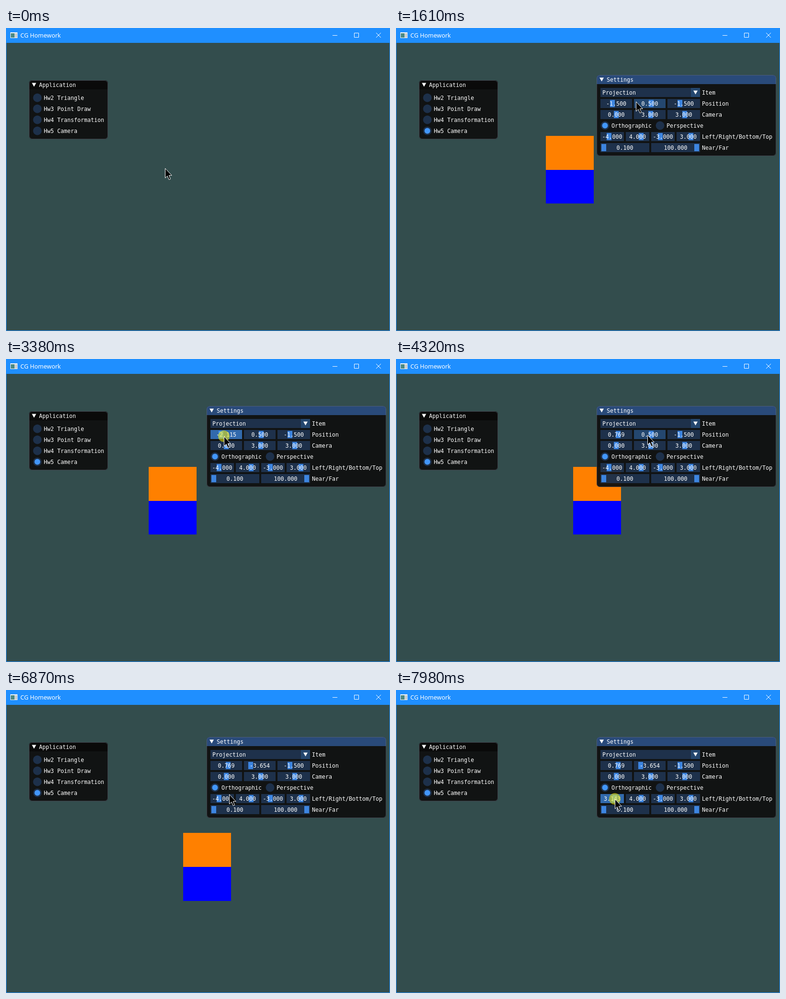
An HTML page that plays this animation: 802 by 632 pixels, repeating every 8000 ms.

```html
<!DOCTYPE html>
<html lang="en">
<head>
<meta charset="utf-8">
<title>CG Homework</title>
<style>
  html, body { margin: 0; width: 100%; height: 100%; overflow: hidden; background: #334d4d; }
  svg { display: block; width: 802px; height: 632px; }
  text { fill: #fff; font: 11.63px "DejaVu Sans Mono", monospace; white-space: pre; }
  .caption { font: 12.5px "Noto Sans", "Open Sans", sans-serif; }
  .mid { text-anchor: middle; }
</style>
</head>
<body>
<svg id="stage" viewBox="0 0 802 632"></svg>
<script>
const LOOP = 8000, STEP = 76.8, START = 55;
const FRAME = 'rgba(41,74,122,.54)', HOVER = 'rgba(66,150,250,.4)', ACTIVE = 'rgba(66,150,250,.67)';
const GRAB = '#3d85e0', GRAB_ACTIVE = '#4296fa', TITLE = '#0a0a0a', TITLE_ACTIVE = '#294a7a';
const ACCENT = '#1f8fff';
const ROW = 23, SIZE = 19, GAP = 4, PAD = 8;

const stage = document.getElementById('stage');

function add(parent, tag, attrs, text) {
  const el = document.createElementNS('http://www.w3.org/2000/svg', tag);
  set(el, attrs);
  if (text !== undefined) el.textContent = text;
  parent.appendChild(el);
  return el;
}
function set(el, attrs) {
  for (const k in attrs) el.setAttribute(k, attrs[k]);
}
const group = () => add(stage, 'g', {});
const rect = (p, x, y, width, height, fill) => add(p, 'rect', { x, y, width, height, fill });
const label = (p, x, y, s, cls = '') => add(p, 'text', { x, y, class: cls }, s);
const arrow = (p, cx, cy) => add(p, 'path', { d: `M${cx - 4.5} ${cy - 3.9}h9l-4.5 7.8z`, fill: '#fff' });
const clamp01 = k => Math.min(1, Math.max(0, k));
const ease = k => k * k * (3 - 2 * k);

// Mouse moves: first step, last step, x, y to reach
const moves = [
  [-1, 9, 68, 210],
  [12, 19, 501, 153],
  [22, 27, 456, 162],
  [29, 38.5, 440, 162],
  [39, 46, 464, 160],
  [48, 53, 525, 158],
  [58, 65, 511, 158],
  [69, 74, 465, 180],
  [84, 88.5, 466, 218],
  [92, 95, 450, 226],
  [98, 102, 457, 227]
];

function mouseAt(n) {
  let x = 332, y = 292;
  for (const [from, to, toX, toY] of moves) {
    const k = ease(clamp01((n - from) / (to - from)));
    x += (toX - x) * k;
    y += (toY - y) * k;
  }
  return { x: Math.round(x), y: Math.round(y) };
}

// Scene
rect(stage, 0, 0, 802, 632, '#334d4d');
const cube = group();
const roof = rect(cube, 0, 0, 0, 0, '#ff8000');
const front = rect(cube, 0, 0, 0, 0, '#0000ff');

// Desktop window
rect(stage, 0, 0, 802, 31, ACCENT);
add(stage, 'path', { d: 'M.5 31V631.5H801.5V31', fill: 'none', stroke: ACCENT });
rect(stage, 9, 9, 15, 12, '#f4f4f4');
rect(stage, 10, 11, 8, 9, '#4c8a84');
rect(stage, 19, 11, 4, 9, '#c3c8cc');
label(stage, 30, 20, 'CG Homework', 'caption');
add(stage, 'path', {
  d: 'M682 15.5h10M727.5 10.5h9v9h-9zM773 10l10 10M783 10l-10 10',
  fill: 'none', stroke: '#fff'
});

function panel(x, y, w, h, name) {
  const g = group();
  add(g, 'rect', { x, y, width: w, height: h, rx: 7, fill: 'rgba(15,15,15,.94)' });
  const bar = add(g, 'path', {
    d: `M${x} ${y + SIZE}v-12q0-7 7-7h${w - 14}q7 0 7 7v12z`, fill: TITLE
  });
  add(g, 'rect', {
    x: x + .5, y: y + .5, width: w - 1, height: h - 1, rx: 6.5,
    fill: 'none', stroke: 'rgba(110,110,128,.5)'
  });
  arrow(g, x + 10.5, y + 9.5);
  label(g, x + 21, y + 14, name);
  return { g, bar, left: x + PAD, top: y + SIZE + PAD };
}

function radio(p, x, y, name, on) {
  const at = { cx: x + 9.5, cy: y + 9.5 };
  const ring = add(p, 'circle', { ...at, r: 9, fill: FRAME });
  const dot = add(p, 'circle', { ...at, r: 6, fill: GRAB_ACTIVE, opacity: on ? 1 : 0 });
  label(p, x + 23, y + 14, name);
  return { ring, dot };
}

function slider(p, x, y, w, range, start) {
  const s = { x, y, w, min: range[0], max: range[1], start };
  s.box = rect(p, x, y, w, SIZE, FRAME);
  s.knob = rect(p, x, y + 2, 10, 15, GRAB);
  s.text = label(p, x + w / 2, y + 14, '', 'mid');
  return s;
}

const app = panel(48, 109, 165, 123, 'Application');
const radios = ['Hw2 Triangle', 'Hw3 Point Draw', 'Hw4 Transformation', 'Hw5 Camera']
  .map((name, i) => radio(app.g, app.left, app.top + ROW * i, name));
const camera = radios[3];

const settings = panel(419, 98, 375, 169, 'Settings');
const { g: sg, left: sx, top: sy } = settings;
const WIDTH = 208;
set(settings.bar, { fill: TITLE_ACTIVE });
rect(sg, sx, sy, WIDTH - SIZE, SIZE, FRAME);
rect(sg, sx + WIDTH - SIZE, sy, SIZE, SIZE, HOVER);
arrow(sg, sx + WIDTH - 9.5, sy + 9.5);
label(sg, sx + GAP, sy + 14, 'Projection');
['Item', 'Position', 'Camera', '', 'Left/Right/Bottom/Top', 'Near/Far']
  .forEach((s, i) => label(sg, sx + WIDTH + GAP, sy + 14 + ROW * i, s));
radio(sg, sx, sy + 3 * ROW, 'Orthographic', true);
radio(sg, sx + 115, sy + 3 * ROW, 'Perspective');

// Sliders share the row; the last one takes the remaining pixels.
function sliderRow(i, range, values) {
  const n = values.length, w = Math.floor((WIDTH - GAP * (n - 1)) / n);
  return values.map((v, j) => {
    const x = j * (w + GAP);
    return slider(sg, sx + x, sy + ROW * i, j < n - 1 ? w : WIDTH - x, range, v);
  });
}
const [posX, posY, posZ] = sliderRow(1, [-5, 5], [-1.5, .5, -1.5]);
const eye = sliderRow(2, [-40, 40], [0, 3, 3]);
const [left, ...sides] = sliderRow(4, [-10, 10], [-4, 4, -3, 3]);
const depth = sliderRow(5, [.1, 100], [.1, 100]);
const sliders = [posX, posY, posZ, ...eye, left, ...sides, ...depth];
posX.drag = [29, 48];
posY.drag = [57, 68];
left.drag = [97, 104];

const halo = add(stage, 'circle', { r: 12, fill: 'rgba(235,230,10,.57)' });
const cursor = add(stage, 'path', {
  d: 'M.5 .8V20.8L5 16.6 8.4 24.4 11.6 23 8.3 15.4H14.2Z',
  fill: '#000', stroke: '#fff'
});

const isHeld = (s, n) => !!s.drag && n >= s.drag[0] && n <= s.drag[1];

// The interface reacts to the mouse one step late.
function valueOf(s, n) {
  if (!s.drag || n < s.drag[0]) return s.start;
  const px = mouseAt(Math.min(n, s.drag[1]) - 1).x - s.x - 7;
  return s.min + (s.max - s.min) * clamp01(px / (s.w - 14));
}

function drawSlider(s, n, seen, busy) {
  const held = isHeld(s, n), v = valueOf(s, n);
  const over = !busy && seen.x >= s.x && seen.x < s.x + s.w && seen.y >= s.y && seen.y < s.y + SIZE;
  const pos = s.x + 7 + (v - s.min) / (s.max - s.min) * (s.w - 14);
  set(s.box, { fill: held ? ACTIVE : over ? HOVER : FRAME });
  set(s.knob, { x: Math.round(pos) - 5, fill: held ? GRAB_ACTIVE : GRAB });
  s.text.textContent = v.toFixed(3);
}

// Orthographic view tilted by 45 degrees, cube side 4.
function drawCube(n) {
  const l = 4 * valueOf(left, n), r = 16;
  const x = valueOf(posX, n), drop = (.5 - valueOf(posY, n)) * 25 * Math.SQRT1_2;
  const toPx = u => Math.ceil(.5 + 800 * (u - l) / (r - l));
  const x0 = toPx(x - 2), x1 = toPx(x + 2);
  const [y, mid, end] = [0, 1, 2].map(i => Math.round(224.9 + drop + i * 100 * Math.SQRT1_2));
  set(roof, { x: x0, width: x1 - x0, y, height: mid - y });
  set(front, { x: x0, width: x1 - x0, y: mid, height: end - mid });
}

function draw(t) {
  const n = Math.floor((t - START) / STEP), m = mouseAt(n), seen = mouseAt(n - 1);
  const open = n >= 11, click = n >= 9 && !open;
  const busy = sliders.some(s => isHeld(s, n));
  const overCamera = seen.x >= 56 && seen.x < 149 && seen.y >= 205 && seen.y < 224;

  set(app.bar, { fill: click ? TITLE_ACTIVE : TITLE });
  set(camera.ring, { fill: click ? ACTIVE : overCamera ? HOVER : FRAME });
  set(camera.dot, { opacity: open ? 1 : 0 });
  for (const g of [sg, cube]) set(g, { visibility: open ? 'visible' : 'hidden' });
  for (const s of sliders) drawSlider(s, n, seen, busy);
  drawCube(n);
  set(halo, { cx: m.x, cy: m.y, visibility: click || busy ? 'visible' : 'hidden' });
  set(cursor, { transform: `translate(${m.x} ${m.y})` });
}

const origin = performance.now();
function tick() {
  draw((performance.now() - origin) % LOOP);
  requestAnimationFrame(tick);
}
tick();
</script>
</body>
</html>
```
